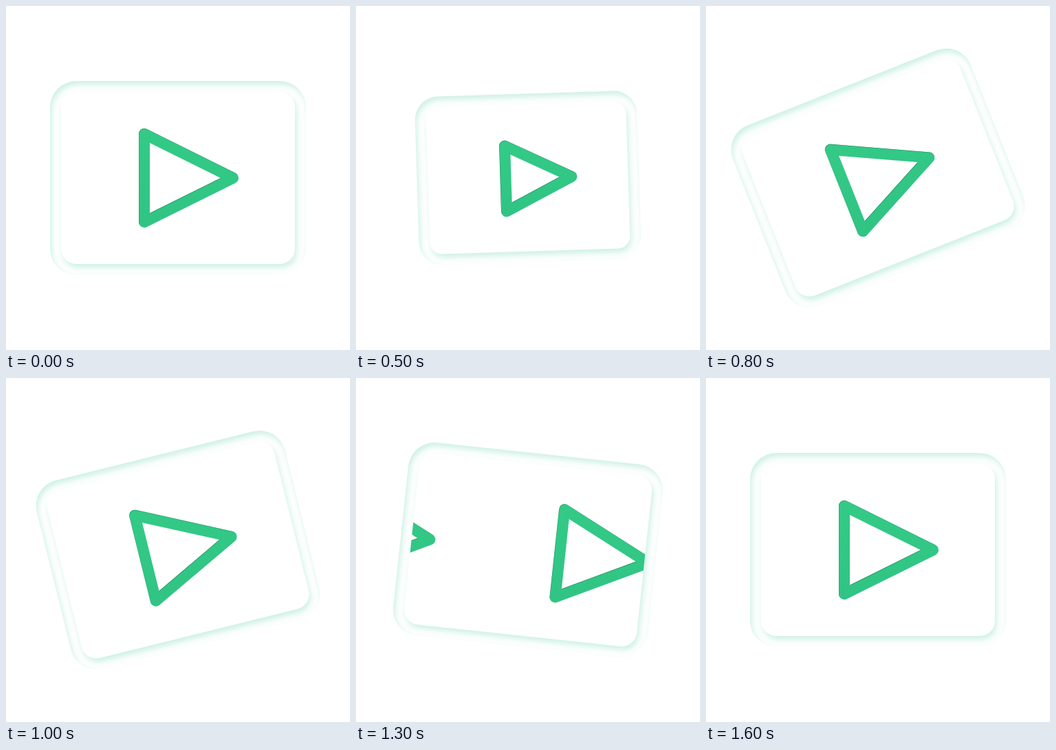
Recreate the animation shown at these times as an HTML page with a canvas. Size 500 by 500 pixels, loop 2010 ms.

```html
<!DOCTYPE html>
<html lang="en">
<head>
<meta charset="utf-8">
<title>Play button</title>
<style>
  html, body { margin: 0; width: 100%; height: 100%; overflow: hidden; background: #fff; }
  canvas { display: block; width: 500px; height: 500px; }
</style>
</head>
<body>
<canvas id="stage" width="500" height="500"></canvas>
<script>
const ctx = document.getElementById('stage').getContext('2d');
const LOOP = 2010;
const STEP = 1000 / 30;
const CENTER = 250;
const HALF = 8;      // half of the line width, the same at every scale
const PIVOT = 15.5;  // the triangle scales around its own middle
const AWAY = 2000;   // shadow casters are drawn this far off stage
const SPACING = 319; // distance between the two sliding triangles

// Keyframes as [ms, value]
const SCALE = [[200, 1], [333, 0.92], [460, 0.855], [633, 0.935], [733, 0.994], [780, 1]];
const ANGLE = [[435, 0], [633, -10.3], [733, -16.4], [845, -23.5], [1000, -13.9],
               [1200, 3.1], [1300, 6.1], [1433, 0.5], [1500, 0]];
const SLIDE = [[1070, 0], [1200, 24.5], [1433, 222], [1600, SPACING]];

// Smooth interpolation that never overshoots its keys
function valueAt(keys, t) {
  const last = keys.length - 1;
  if (t <= keys[0][0]) return keys[0][1];
  if (t >= keys[last][0]) return keys[last][1];
  const secant = i => (keys[i + 1][1] - keys[i][1]) / (keys[i + 1][0] - keys[i][0]);
  const slope = i => {
    if (i === 0 || i === last) return 0;
    const a = secant(i - 1), b = secant(i);
    return a * b <= 0 ? 0 : 2 * a * b / (a + b);
  };
  let i = 0;
  while (t >= keys[i + 1][0]) i++;
  const span = keys[i + 1][0] - keys[i][0];
  const u = (t - keys[i][0]) / span;
  const ease = u * u * (3 - 2 * u);
  return keys[i][1] + (keys[i + 1][1] - keys[i][1]) * ease
    + span * u * (1 - u) * ((1 - u) * slope(i) - u * slope(i + 1));
}

function framePath(scale) {
  const path = new Path2D(), hole = new Path2D();
  const add = (target, grow) => {
    const w = 356 * scale + grow * 2, h = 266 * scale + grow * 2;
    target.roundRect(-w / 2, -h / 2, w, h, 30 * scale + grow);
  };
  add(path, HALF);
  add(path, -HALF);
  add(hole, -HALF);
  return { path, hole };
}

// Outline of a triangle stroked with round joins: rounded outside, sharp inside
function trianglePath(scale, dx) {
  const points = [[-64.5, -64], [64.5, 0], [-64.5, 64]]
    .map(p => [p[0] * scale + PIVOT + dx, p[1] * scale]);
  const path = new Path2D();
  const sides = points.map((p, i) => {
    const q = points[(i + 1) % 3];
    return Math.hypot(q[0] - p[0], q[1] - p[1]);
  });
  const perimeter = sides[0] + sides[1] + sides[2];

  points.forEach((p, i) => {
    const prev = points[(i + 2) % 3], next = points[(i + 1) % 3];
    const from = Math.atan2(p[1] - prev[1], p[0] - prev[0]) - Math.PI / 2;
    const to = Math.atan2(next[1] - p[1], next[0] - p[0]) - Math.PI / 2;
    path.arc(p[0], p[1], HALF, from, to);
  });
  path.closePath();

  const middle = [0, 1].map(axis =>
    points.reduce((sum, p, i) => sum + p[axis] * sides[(i + 1) % 3], 0) / perimeter);
  const area = 129 * 128 * scale * scale / 2;
  const shrink = 1 - HALF / (2 * area / perimeter);
  points.forEach((p, i) => {
    const x = middle[0] + (p[0] - middle[0]) * shrink;
    const y = middle[1] + (p[1] - middle[1]) * shrink;
    if (i) path.lineTo(x, y); else path.moveTo(x, y);
  });
  path.closePath();
  return path;
}

function place(angle, shiftX) {
  ctx.setTransform(1, 0, 0, 1, CENTER + shiftX, CENTER);
  ctx.rotate(angle);
}

// The offset stays in screen space while the shape rotates
function innerShadow(path, angle, color, blur, x, y) {
  const outside = new Path2D();
  outside.rect(-600, -600, 1200, 1200);
  outside.addPath(path);
  ctx.save();
  ctx.clip(path, 'evenodd');
  place(angle, -AWAY);
  ctx.shadowColor = color;
  ctx.shadowBlur = blur;
  ctx.shadowOffsetX = x + AWAY;
  ctx.shadowOffsetY = y;
  ctx.fillStyle = '#000';
  ctx.fill(outside, 'evenodd');
  ctx.restore();
}

function drawTriangle(scale, dx, angle) {
  const path = trianglePath(scale, dx);
  const green = ctx.createLinearGradient(0, -72 * scale, 0, 72 * scale);
  green.addColorStop(0, '#33ca86');
  green.addColorStop(1, '#30c484');
  ctx.fillStyle = green;
  ctx.fill(path, 'evenodd');
  innerShadow(path, angle, 'rgba(8, 50, 34, 0.5)', 0.6, 0.35, 0.5);
}

function draw(t) {
  const scale = valueAt(SCALE, t);
  const angle = valueAt(ANGLE, t) * Math.PI / 180;
  const slide = valueAt(SLIDE, t);
  const frame = framePath(scale);

  ctx.setTransform(1, 0, 0, 1, 0, 0);
  ctx.fillStyle = '#fff';
  ctx.fillRect(0, 0, 500, 500);

  place(angle, 0);
  innerShadow(frame.path, angle, '#cbf0e4', 10, 2.5, 5);

  ctx.save();
  ctx.clip(frame.hole);
  drawTriangle(scale * scale, slide, angle);
  if (slide > 0) drawTriangle(scale * scale, slide - SPACING, angle);
  ctx.restore();
}

const start = performance.now();
function tick() {
  const t = (performance.now() - start) % LOOP;
  draw(Math.floor((t + 3.5) / STEP) * STEP);
  requestAnimationFrame(tick);
}
tick();
</script>
</body>
</html>
```
